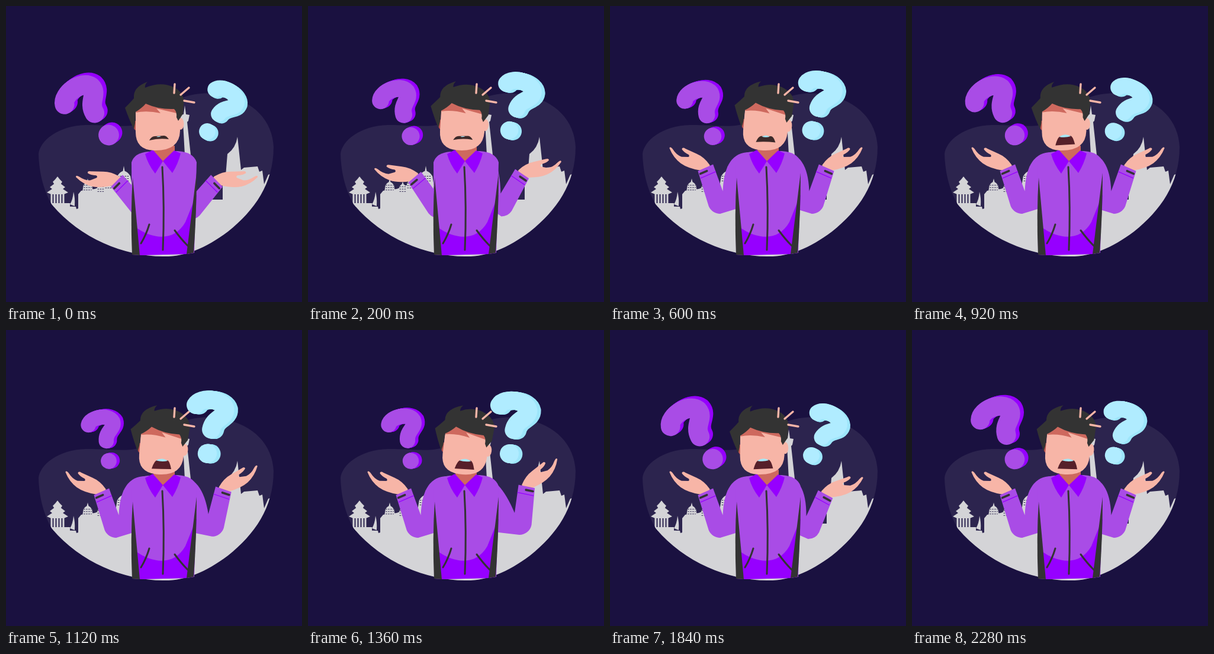
An HTML page with a canvas for the animation above (3.04 s loop, 500 by 500 pixels).

```html
<!DOCTYPE html>
<html lang="en">
<head>
<meta charset="utf-8">
<title>Shrug</title>
<style>
html, body { margin: 0; width: 100%; height: 100%; overflow: hidden; background: #1a1140; }
canvas { display: block; width: 500px; height: 500px; }
</style>
</head>
<body>
<canvas id="stage" width="500" height="500"></canvas>
<script>
const g = document.getElementById('stage').getContext('2d');
const LOOP = 3040, STEP = 40, END = 2280;
const BG = '#1a1140', SKY = '#2c244e', CITY = '#d4d4d7', SKIN = '#f7b5a7', SHADE = '#ce695e',
  INK = '#333333', LILAC = '#a94ce6', VIOLET = '#9600ff';

function fill(d, color) {
  g.fillStyle = color;
  g.fill(new Path2D(d));
}

function line(d, color, width) {
  g.strokeStyle = color;
  g.lineWidth = width;
  g.stroke(new Path2D(d));
}

const rad = deg => deg * Math.PI / 180;
const mix = (a, b, u) => a + (b - a) * u;
// Cosine ease from a to b between two times
function ease(t, start, end, a, b) {
  const u = Math.min(1, Math.max(0, (t - start) / (end - start)));
  return mix(a, b, (1 - Math.cos(Math.PI * u)) / 2);
}

// Four equal swings between 0 and 1, then a slow settle
function sway(t, beat, rest) {
  const k = Math.min(4, Math.floor(t / beat));
  return k < 4 ? ease(t, k * beat, (k + 1) * beat, k % 2, 1 - k % 2) : ease(t, 4 * beat, END, 0, rest);
}

const leftLift = t => ease(t, 0, 600, -1.8, 0);
const rightLift = t => ease(t, 0, 400, -1.8, 0) + ease(t, 920, 1360, 0, 1) +
  ease(t, 1360, 1840, 0, -1.4) + ease(t, 1840, END, 0, .4);

const BLOB = `M55 250C57 228 88 202 135 201C200 201 225 212 262 178C290 150 330 143 365 150
  C420 160 450 195 452 238C452 300 420 345 375 381C335 411 300 424 265 423
  C200 423 125 392 78 336C65 315 56 285 55 250Z`;

function stupa(x, y, w) {
  const h = w * 2.5;
  fill(`M${x - w} ${y}L${x - w * .8} ${y - h * .5}Q${x - w * .5} ${y - h * .7} ${x - 1.5} ${y - h * .75}
    L${x} ${y - h}L${x + 1.5} ${y - h * .75}Q${x + w * .5} ${y - h * .7} ${x + w * .8} ${y - h * .5}L${x + w} ${y}Z`, CITY);
  g.setLineDash([1.5, 2.5]);
  for (let k = 0; k < 3; k++) line(`M${x - w * .7} ${y - h * .5 + k * 4}h${w * 1.4}`, SKY, 1.2);
  g.setLineDash([]);
}

function pagoda(x, y) {
  for (let k = 0; k < 3; k++) {
    const w = 8 + 5 * k, top = y + 4 + 8 * k;
    fill(`M${x} ${top - 5}L${x + w * .5} ${top}L${x + w} ${top + 4 + k}L${x + w * .6} ${top + 9}H${x - w * .6}
      L${x - w} ${top + 4 + k}L${x - w * .5} ${top}Z`, CITY);
  }
  for (let k = -2; k <= 2; k++) line(`M${x + k * 5} ${y + 28}v17`, CITY, 3);
  fill(`M${x - 17} ${y + 44}h38v6h-38Z`, CITY);
}

function scenery() {
  g.fillStyle = BG;
  g.fillRect(0, 0, 500, 500);
  fill(BLOB, SKY);
  g.save();
  g.clip(new Path2D(BLOB));
  fill(`M50 337L118 339L119 343L122 342L122 318L127 312L150 309L165 303H212V327H366
    V290L371 287L374 250Q388 240 391 221L397 277L402 273L425 271L428 280L433 278L436 301L443 285L460 280
    V450H50Z`, CITY);
  pagoda(87, 289);
  fill('M114 314Q117 324 116 338L108 335Q113 327 114 314Z', CITY);
  stupa(138, 314, 9);
  stupa(160, 314, 7);
  stupa(173, 308, 7);
  stupa(199, 305, 14);
  fill('M302 168L304 183L310 184L308 194L306 196L314 270H303L299 196L296 194L294 184L300 183Z', CITY);
  g.restore();
}

// Lift: -1.8 hanging, 0 shrugging, 1 raised; drift is the elbow's sideways travel
function arm(lift, drift) {
  const ex = 186 - drift * lift, ey = 330 - 5 * lift;
  const tilt = rad(23.5 - 12 * lift), dx = -Math.sin(tilt), dy = -Math.cos(tilt);
  // Point given by distance along the forearm and distance toward its inner side
  const at = (along, inner) => `${ex + dx * along - dy * inner} ${ey + dy * along + dx * inner}`;
  g.save();
  g.translate(ex + dx * 62, ey + dy * 62);
  g.rotate(rad(13 * lift + 2));
  fill(`M-62-31Q-61-35-56-29Q-50-20-41-17L-30-17Q-27-18-29-21Q-38-25-41-30Q-40-34-35-31L-16-23
    Q-3-18 7-5L8 4L-2 10L-8 5Q-30 2-42-6Q-55-15-62-31Z`, SKIN);
  g.restore();
  const shoulder = 193 + 12 * lift * lift;
  const sleeve = new Path2D(`M238 247Q${shoulder} 245 ${at(14, 11)}L${at(62, 14)}L${at(62, -14)}L${at(0, -21)}`);
  sleeve.arc(ex, ey, 21, Math.atan2(-dx, dy), Math.PI / 2, true);
  sleeve.lineTo(222, 340);
  sleeve.lineTo(240, 330);
  g.fillStyle = LILAC;
  g.fill(sleeve);
  line(`M${at(49, -14)}L${at(49, 13)}`, VIOLET, 1.3);
  line(`M${at(56, -12)}L${at(56, 0)}`, INK, 3.6);
}

function body() {
  fill('M240 246Q217 248 212 264L213 420L226 421L305 419L318 417L322 264Q317 247 290 245Z', LILAC);
  fill('M218 373C250 396 285 397 303 365L322 318L317 417L305 419L226 421Z', VIOLET);
  fill('M214 290L226 421L213 420Q210 350 214 290Z', INK);
  fill('M322 282L305 419L317 417Q322 350 322 282Z', INK);
  line('M264 272Q268 340 265 412', INK, 3);
  line('M242 369Q237 386 228 401M285 379Q296 394 307 405', INK, 3);
  fill('M249 236H285V247L265 264L249 247Z', SHADE);
  fill('M248 243L265 262L252 283Q240 268 235 250Z', VIOLET);
  fill('M284 244L265 262L281 282Q291 266 295 249Z', VIOLET);
}

function head(turn, open) {
  g.save();
  g.translate(258, 282);
  g.rotate(turn * .128);
  g.translate(-258, -282);
  fill('M212 194L222 194L221 212Q214 208 212 194Z', '#b9534f');
  g.fillStyle = SKIN;
  g.beginPath();
  g.ellipse(295, 199, 5.5, 10, 0, 0, 7);
  g.fill();
  fill('M219 172L219 213Q219 243 250 244Q293 245 294 211L294 170Z', SKIN);
  fill('M219 180L235 160L286 166L288 181Q270 177 254 173L261 181Q238 176 219 180Z', SHADE);
  const tip = 239 + 5 * turn;
  fill(`M201 172Q210 163 216 156Q214 137 ${tip} 128Q${tip - 5} 133 ${tip - 4} 138Q262 127 283 137
    Q303 147 300 167L299 182L291 194L288 188Q289 179 284 174Q258 175 236 165Q230 172 219 179L218 198L216 208
    Q208 192 201 172Z`, INK);
  const y = 227 + 8.5 * open, w = 4 + 6 * open;
  fill(`M242 ${y}Q246 220 251 220L267 219Q271 219 275 ${y - 2}Q258 ${y - 4 + 3 * open} 242 ${y}Z`,
    mix(0, 1, open) > .5 ? '#56202a' : '#3c2a2a');
  fill(`M${258 - w} 221Q258 ${219 - 5 * open} ${258 + w} 220Q258 ${222 + open} ${258 - w} 221Z`, '#a6e8f6');
  g.restore();
  line('M284 147L285 132M295 150L309 138M301 160L318 163', SKIN, 3.4);
}

const HOOK = new Path2D('M-27-60C-23-72 6-75 12-62C15-50-1-48-1-32');

function questionMark(x, y, angle, size, front, side) {
  g.save();
  g.translate(x, y);
  g.rotate(rad(angle));
  g.scale(size, size);
  g.lineWidth = 24;
  g.translate(5, -.5);
  for (let k = 5; k >= 0; k--) {
    g.strokeStyle = g.fillStyle = k ? side : front;
    g.stroke(HOOK);
    g.beginPath();
    g.arc(0, 0, 12.6, 0, 7);
    g.fill();
    if (k) g.translate(-1, .1);
  }
  g.restore();
}

function draw(t) {
  scenery();
  arm(leftLift(t), 25);
  g.save();
  g.translate(527, 0);
  g.scale(-1, 1);
  arm(rightLift(t), 16);
  g.restore();
  body();
  head(sway(t, 430, .67), ease(t, 320, 920, 0, 1));
  // The marks trade size: one grows as the other shrinks
  const upright = sway(t, 410, .45), grow = 1 - sway(t, 410, .1);
  questionMark(173.5, 222 - 4 * grow, -31 * (1 - upright), 1 + .38 * grow, LILAC, VIOLET);
  questionMark(340, 208 + 4 * grow, mix(35, 6, upright), 1.32 - .22 * grow, '#b0ecff', '#9ee6fb');
}

g.lineCap = g.lineJoin = 'round';
function tick() {
  const t = performance.now() % LOOP;
  draw(Math.min(Math.floor(t / STEP) * STEP, END));
  requestAnimationFrame(tick);
}
tick();
</script>
</body>
</html>
```
